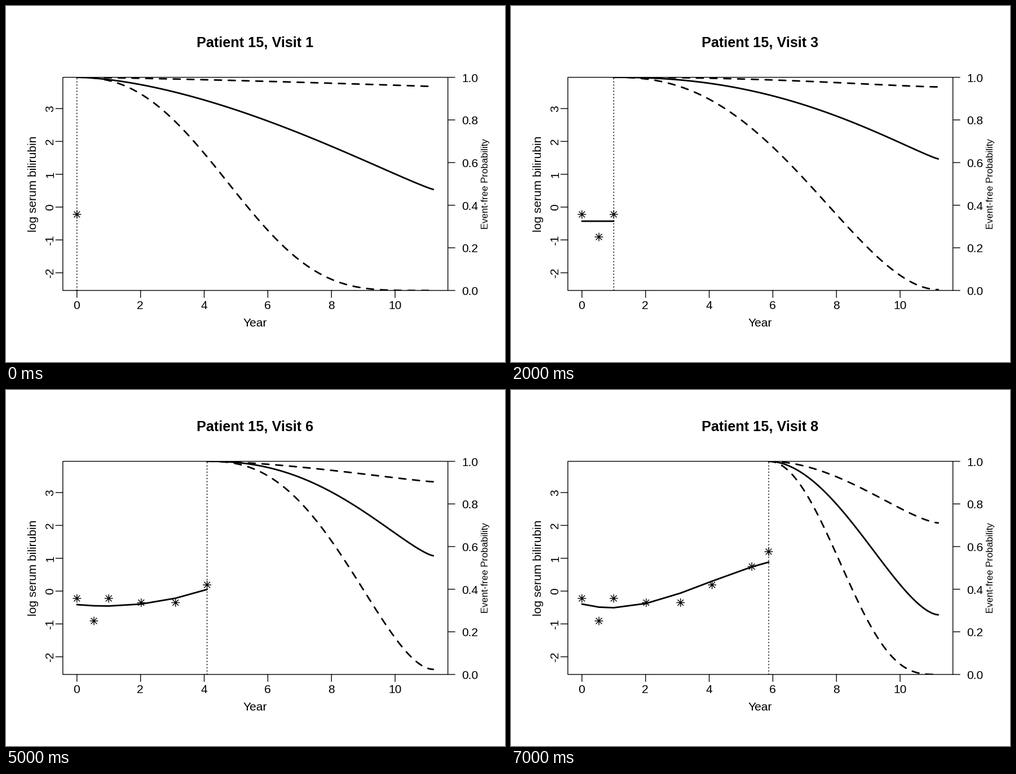
These frames come from a looping animation (885x632 px, 8 s). A matplotlib script:

```python
import numpy as np
import matplotlib.pyplot as plt
from matplotlib.animation import FuncAnimation
from matplotlib.patches import Rectangle

W, H = 885, 632
PT = 0.72                       # points per pixel at 100 dpi
THIN, BOLD = 1.4 * PT, 2.8 * PT
LEFT, RIGHT, TOP, BOTTOM = 100.8, 783.7, 126.6, 505
TICK = 12.5
END = 11.2                      # last predicted year

plt.rcParams["font.family"] = "Liberation Sans"
plt.rcParams["path.snap"] = False
fig = plt.figure(figsize=(W / 100, H / 100), dpi=100, facecolor="white")
ax = fig.add_axes([0, 0, 1, 1])
ax.set_xlim(0, W)
ax.set_ylim(H, 0)
ax.axis("off")


def year_x(year):
    return 125.8 + 56.43 * year


def prob_y(p):
    return BOTTOM - (BOTTOM - TOP) * p


def line(xs, ys, lw=THIN, **kw):
    kw.setdefault("solid_capstyle", "round")
    return ax.plot(xs, ys, color="black", lw=lw, **kw)[0]


def label(x, y, text, size=21, **kw):
    kw.setdefault("ha", "center")
    return ax.text(x, y, text, fontsize=size * PT, color="black",
                   va="baseline", rotation_mode="anchor", **kw)


# Frame, axes and labels
ax.add_patch(Rectangle((LEFT, TOP), RIGHT - LEFT, BOTTOM - TOP,
                       fill=False, ec="black", lw=THIN))
for year in range(0, 11, 2):
    x = year_x(year)
    line([x, x], [BOTTOM, BOTTOM + TICK])
    label(x - 0.4, 538, str(year))
for value in range(-2, 4):
    y = 357 - 58.3 * value
    line([LEFT - TICK, LEFT], [y, y])
    label(84, y, str(value), rotation=90)
for k in range(6):
    y = prob_y(k / 5)
    line([RIGHT, RIGHT + TICK], [y, y])
    label(808.5, y + 8, f"{k / 5:.1f}", ha="left")
label(442, 569, "Year")
label(54.5, 315.5, "log serum bilirubin", rotation=90)
label(855, 315.5, "Event-free Probability", 16.8, rotation=90)

# Measurements: year of each visit and marker height
years = np.array([0, 0.535, 1, 2.02, 3.1, 4.09, 5.34, 5.87])
heights = [370, 410, 370, 377.5, 377.5, 346, 313.5, 287]

# Fitted trend per visit: polynomial in years, constant term first
trends = [(370,), (385.5, 12), (382,), (382, 1, -0.75), (381.5, 1.81, -1.31),
          (381, 5.44, -2.94), (380.5, 10.45, -7.05, 0.6),
          (380, 15, -9.27, 0.776)]

# Per visit, total drop and two shape exponents of each survival curve
median = [(0.526, 1.65, 1.12), (0.328, 2.8, 1.15), (0.383, 2.25, 1.15),
          (0.363, 2.35, 1.2), (0.353, 2.5, 1.25), (0.443, 2.3, 1.35),
          (0.564, 2.1, 1.45), (0.72, 1.9, 1.7)]
upper = [(0.043, 1.3, 1), (0.0145, 1.2, 1), (0.045, 2.2, 1.4),
         (0.048, 1.4, 1), (0.049, 1.1, 1.05), (0.096, 1.6, 1.2),
         (0.17, 1.5, 1.3), (0.289, 1.9, 1.5)]
lower = [(1, 2.4, 5), (0.984, 2.8, 1.75), (0.996, 2.4, 2),
         (0.985, 2.6, 2.1), (0.963, 2.9, 1.75), (0.976, 2.5, 1.9),
         (0.987, 2.1, 2.05), (1, 2, 3.3)]


def survival(start, drop, a, b):
    """S-shaped fall from 1 at the start year to 1 - drop at END."""
    u = np.linspace(0, 1, 120)
    p = 1 - drop * (1 - (1 - u ** a) ** b)
    return year_x(start + (END - start) * u), prob_y(p)


def star_strokes(x, y):
    """Four crossing strokes, separated by gaps."""
    xs, ys = [], []
    for dx, dy in [(7, 0), (0, 7), (5, 5), (5, -5)]:
        xs += [x - dx, x + dx, np.nan]
        ys += [y - dy, y + dy, np.nan]
    return xs, ys


# Moving parts
title = label(441.5, 73, "", 25.2, weight="bold")
cursor = line([], [], ls=(0, (1, 3)), dash_capstyle="round")
trend_line = line([], [], BOLD)
dashed = dict(ls=(0, (4.36, 4.36)), dash_capstyle="round")
curve_lines = [line([], [], BOLD), line([], [], BOLD, **dashed),
               line([], [], BOLD, **dashed)]
stars = line([], [])

plot_area = Rectangle((LEFT, TOP), RIGHT - LEFT, BOTTOM - TOP,
                      transform=ax.transData)
for artist in [cursor, trend_line] + curve_lines:
    artist.set_clip_path(plot_area)


def update(i):
    title.set_text(f"Patient 15, Visit {i + 1}")
    seen = years[:i + 1]
    cursor.set_data([year_x(years[i])] * 2, [BOTTOM, TOP])

    # A trend needs at least two measurements
    fit = np.polyval(trends[i][::-1], seen) if i else np.full(1, np.nan)
    trend_line.set_data(year_x(seen), fit)

    for artist, shapes in zip(curve_lines, (median, upper, lower)):
        artist.set_data(*survival(years[i], *shapes[i]))

    strokes = [star_strokes(x, y) for x, y in zip(year_x(seen), heights)]
    stars.set_data(*(np.concatenate(part) for part in zip(*strokes)))
    return [title, cursor, trend_line, stars] + curve_lines


anim = FuncAnimation(fig, update, frames=len(years), interval=1000,
                     repeat=True, repeat_delay=0)
plt.show()
```
